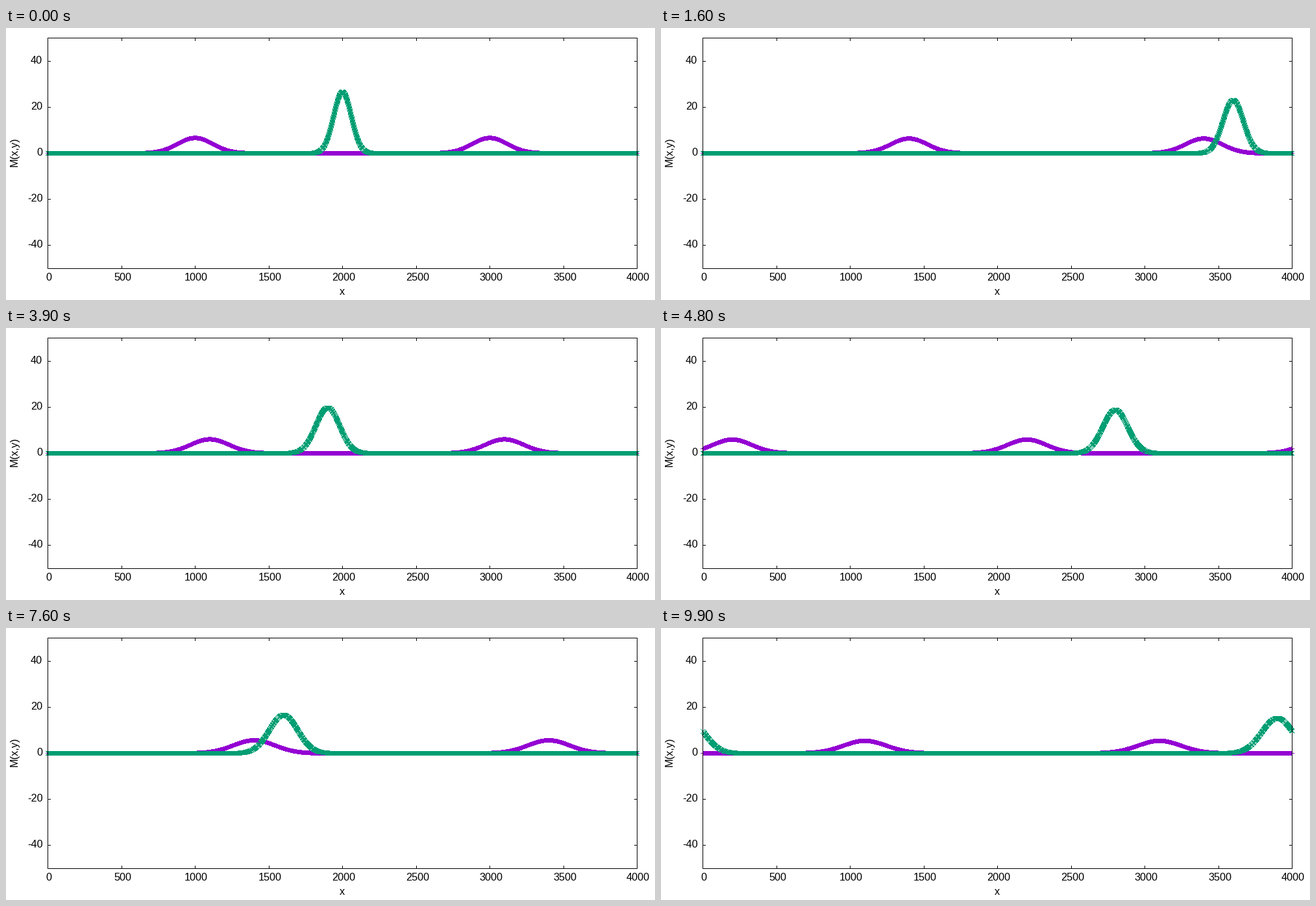
Animation, 1000 px wide and 420 px high, one loop 10000 ms. Source, as a matplotlib script:

```python
import numpy as np
import matplotlib.pyplot as plt
from matplotlib.animation import FuncAnimation
from matplotlib.collections import LineCollection
from matplotlib.colors import to_rgba

W, H, DPI = 1000, 420, 100
FRAMES, INTERVAL = 100, 100
LEFT, RIGHT, TOP, BOTTOM = 64, 972, 15, 371   # pixel columns and rows
LENGTH = 4000
PURPLE, GREEN = to_rgba("#9400D3"), to_rgba("#009E73")
PX = 72 / DPI          # one pixel in points
ARM = 3                # half size of a marker in pixels
SPEED = 100            # x units per frame
SPREAD = 75            # variance gained per frame
DIGIT, MINUS = 9, 5    # character advances in pixels

plt.rcParams["font.family"] = "Liberation Sans"
plt.rcParams["font.size"] = 16.2 * PX

fig = plt.figure(figsize=(W / DPI, H / DPI), dpi=DPI, facecolor="white")
ax = fig.add_axes([0, 0, 1, 1])
ax.axis("off")


def column(x):
    return np.floor(LEFT + x * (RIGHT - LEFT) / LENGTH + 0.5).astype(int)


def row(y):
    return BOTTOM - np.floor((y + 50) * (BOTTOM - TOP) / 100 + 0.5).astype(int)


def strokes(segments, z):
    """Black one-pixel lines through pixel centres."""
    ax.add_collection(LineCollection(np.array(segments) + 0.5, colors="black",
                                     linewidths=PX, zorder=z,
                                     capstyle="projecting", snap=False))


def label(x, y, text, **kw):
    ax.text(x, y, text, color="black", va="baseline", **kw)


layer = np.zeros((H, W, 4))
picture = ax.imshow(layer, extent=(0, W, H, 0), aspect="auto",
                    interpolation="nearest", zorder=2)

# Ticks, mirrored on the opposite sides
ticks = []
for value in range(0, LENGTH + 1, 500):
    x = column(value)
    ticks += [[(x, TOP), (x, TOP + 4)], [(x, BOTTOM), (x, BOTTOM - 4)]]
    text = str(value)
    label(x + 2 - np.ceil(DIGIT * len(text) / 2), 390, text)
for value in range(-40, 41, 20):
    y = row(value)
    ticks += [[(LEFT, y), (LEFT + 4, y)], [(RIGHT, y), (RIGHT - 4, y)]]
    text = str(value)
    width = DIGIT * len(text.strip("-")) + MINUS * text.count("-")
    label(56 - width, y + 4, text)
strokes(ticks, 1)

corners = [(LEFT, TOP), (RIGHT, TOP), (RIGHT, BOTTOM), (LEFT, BOTTOM)]
strokes(list(zip(corners, corners[1:] + corners[:1])), 5)

label(518, 411.5, "x", ha="center")
label(17.5, 191, "M(x,y)", ha="center", rotation=90, rotation_mode="anchor")

# Marker shapes as pixel offsets
arm = range(-ARM, ARM + 1)
PLUS = [(k, 0) for k in arm] + [(0, k) for k in arm]
CROSS = [(k, k) for k in arm] + [(k, -k) for k in arm]

grid = np.arange(LENGTH + 1)
cols = column(grid)


def pulse(center, period, mass, sigma, t):
    """Gaussian on a ring that widens while keeping its area."""
    var = sigma ** 2 + SPREAD * t
    d = (grid - center + period / 2) % period - period / 2
    return mass / np.sqrt(2 * np.pi * var) * np.exp(-d ** 2 / (2 * var))


def stamp(values, shape, color):
    rows = row(values)
    for dx, dy in shape:
        layer[rows + dy, cols + dx] = color


def update(t):
    layer[:] = 0
    stamp(pulse(1000 - SPEED * t, LENGTH / 2, 2000, 120, t), PLUS, PURPLE)
    stamp(pulse(2000 + SPEED * t, LENGTH, 4000, 60, t), CROSS, GREEN)
    picture.set_data(layer)
    return picture,


anim = FuncAnimation(fig, update, frames=FRAMES, interval=INTERVAL,
                     repeat=True, repeat_delay=0)
plt.show()
```
